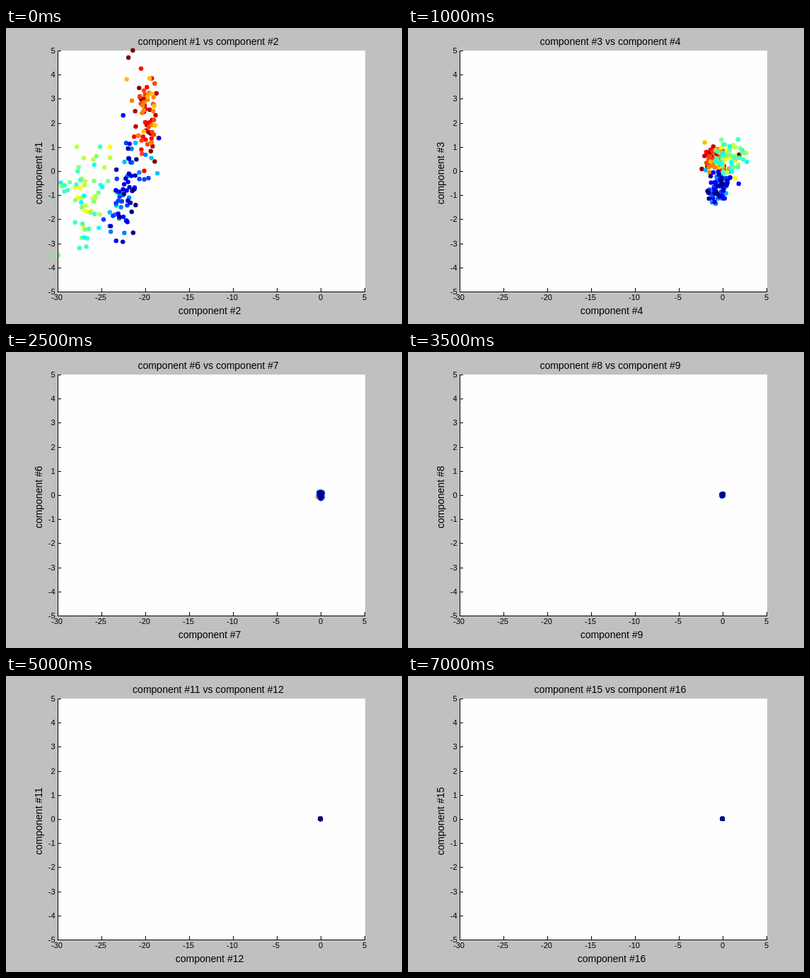
Animation, 560 px wide and 420 px high, one loop 7.5 s. Source, as an HTML page:

```html
<!DOCTYPE html>
<html lang="en">
<head>
<meta charset="utf-8">
<title>Component scatter plots</title>
<style>
  html, body { margin: 0; width: 100%; height: 100%; overflow: hidden; background: #bfc1be; }
  svg { display: block; width: 560px; height: 420px; }
  text { font: 14px "Liberation Sans", Arial, sans-serif; text-anchor: middle; }
  .tick { font-size: 11px; }
  .right { text-anchor: end; }
</style>
</head>
<body>
<svg id="stage" viewBox="0 0 560 420">
  <rect x="73" y="32" width="435" height="342" fill="#fdfefd"/>
  <g id="dots"></g>
  <path id="axes" fill="none" stroke="#000"/>
  <text id="title" x="286" y="24"></text>
  <text id="xLabel" x="288" y="406"></text>
  <text id="yLabel" transform="translate(51 206) rotate(-90)"></text>
</svg>
<script>
const STEP = 500, PLOTS = 15, DIMS = PLOTS + 1;
const $ = id => document.getElementById(id);
const toX = v => 72.7 + 12.4 * (v + 30);
const toY = v => 202.7 - 34.2 * v;

function add(parent, tag, attrs, text = '') {
  const el = document.createElementNS('http://www.w3.org/2000/svg', tag);
  for (const key in attrs) el.setAttribute(key, attrs[key]);
  el.textContent = text;
  parent.append(el);
  return el;
}

let seed = 7;
function random() {
  seed = (seed * 1664525 + 1013904223) % 4294967296;
  return seed / 4294967296;
}
// Bell-shaped noise with the given standard deviation
const noise = sd => (random() + random() + random() - 1.5) * 2 * sd;

// Rainbow from dark blue (0) to dark red (1), in sixteen steps
function jet(level) {
  const v = Math.round(level * 16) / 16;
  const channel = peak => 255 * Math.min(1, Math.max(0, 1.5 - Math.abs(4 * v - peak)));
  return `rgb(${[3, 2, 1].map(channel)})`;
}

// Bell-shaped clouds; `far` holds a few outlying dots as level, first and second value
const clouds = [
  { count: 66, levels: [1, 0.69], mean: [-19.9, 2.4], sd: [0.6, 0.85], slant: 0, shift: 0.1, next: [0.45, -0.08],
    far: [[1, -21.4, 5], [1, -21.9, 4.7], [0.69, -22.1, 3.8], [0.88, -20.1, 0]] },
  { count: 58, levels: [0.63, 0.38], mean: [-26.7, -1.2], sd: [1.4, 0.95], slant: 0.4, shift: 0, next: [0.45, 0.1],
    far: [[0.56, -27.8, 1], [0.44, -27.5, -3.2], [0.38, -29.6, -0.5], [0.63, -24, 1]] },
  { count: 70, levels: [0.31, 0], mean: [-22.1, -0.85], sd: [1, 0.9], slant: 0.5, shift: 1.15, next: [-0.65, 0],
    far: [[0.13, -22.5, 2.3], [0.13, -23.3, -2.9], [0.31, -18.6, -0.1]] }
];

// The third value depends linearly on the first two; later ones fade to zero
function addDot(level, a, b, { shift, next }) {
  const c = -12.7 - 0.528 * a + 0.627 * b + shift + noise(0.12);
  const values = [a, b, c, next[0] + noise(0.33), next[1] + noise(0.15)];
  for (let sd = 0.11; values.length < DIMS; sd *= 0.6) values.push(noise(sd));
  dots.push({ values, el: add($('dots'), 'circle', { r: 3.2, fill: jet(level) }) });
}

const dots = [];
for (const cloud of clouds) {
  const { count, levels: [high, low], mean, sd, slant, far } = cloud;
  for (const [level, a, b] of far) addDot(level, a, b, cloud);
  for (let i = 0; i < count; i++) {
    const rise = noise(sd[1]);
    addDot(high + (low - high) * i / (count - 1),
      mean[0] + slant * rise + noise(sd[0]), mean[1] + rise, cloud);
  }
}

let axes = 'M73.5 32V374.5H508';
for (let v = -30; v <= 5; v += 5) {
  const x = Math.round(73 + 12.4 * (v + 30));
  axes += `M${x + 0.5} 374v-5`;
  add($('stage'), 'text', { x: x - 1 + (v >= 0), y: 386, class: 'tick' }, v);
}
for (let v = -5; v <= 5; v++) {
  const y = Math.round(203 - 34.2 * v);
  axes += `M73 ${y + 0.5}h5`;
  add($('stage'), 'text', { x: 69.5, y: y + 4, class: 'tick right' }, v);
}
$('axes').setAttribute('d', axes);

let shown = -1;
function draw(now) {
  const plot = Math.floor(now / STEP) % PLOTS;
  if (plot === shown) return;
  shown = plot;
  const first = `component #${plot + 1}`, second = `component #${plot + 2}`;
  $('title').textContent = `${first} vs ${second}`;
  $('xLabel').textContent = second;
  $('yLabel').textContent = first;
  for (const { values, el } of dots) {
    el.setAttribute('cx', toX(values[plot]));
    el.setAttribute('cy', toY(values[plot + 1]));
  }
}

const start = performance.now();
function tick() {
  draw(performance.now() - start);
  requestAnimationFrame(tick);
}
tick();
</script>
</body>
</html>
```
